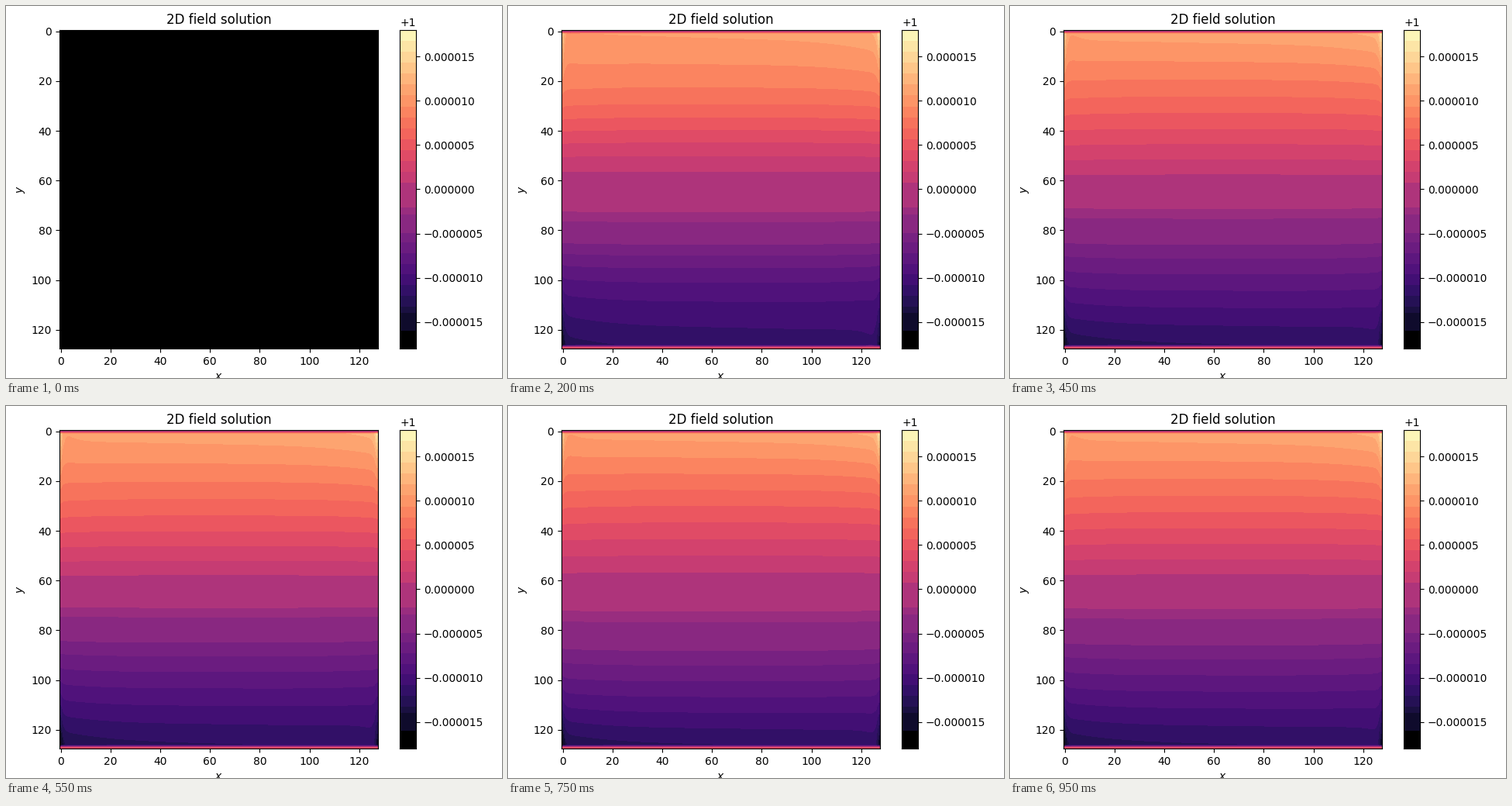
A matplotlib script for the animation above (1000 ms loop, 640 px wide and 480 px high).

```python
import numpy as np
import matplotlib.pyplot as plt
from matplotlib.animation import FuncAnimation
from matplotlib.colors import BoundaryNorm, ListedColormap

W, H, N = 640, 480, 128
FRAMES, INTERVAL = 20, 50
LIMIT = 18  # colour range, in millionths away from 1


def banded_colors():
    """Magma in steps, with wider steps at the dark end and the middle."""
    upper = np.linspace(0.8, LIMIT, 15)
    middle = [-4.9, -2.8, -2]
    lower = np.linspace(-12, -6, 6)
    dark = [-LIMIT, -16, -14, -13.3]
    levels = np.concatenate([dark, lower, middle, upper])
    mids = (levels[:-1] + levels[1:]) / 2
    colors = plt.get_cmap("magma")((mids + LIMIT) / (2 * LIMIT))
    colors[0, :3] = 0
    return ListedColormap(colors), BoundaryNorm(levels, len(mids))


cells = np.arange(N)
u = ((cells - 63.5) / 64)[:, None]
x = ((cells - 63.5) / 64)[None, :]
left, right = cells[None, :], (N - 1 - cells)[None, :]


def side_tilt():
    """Rises to the right near the top and bottom, bending at the corners."""
    slope = 0.3 * x + 0.2 * x**3
    top = slope - 0.9 * np.exp(-left / 6) + 0.3 * np.exp(-right / 14)
    bottom = slope + 0.9 * np.exp(-right / 6) - 0.3 * np.exp(-left / 14)
    return np.abs(u)**5 * np.where(u < 0, top, bottom)


TILT = side_tilt()
WALLS = -4 * u**5 * (np.exp(-left / 0.7) + np.exp(-right / 0.7))


def field(ms):
    if ms == 0:
        return np.full((N, N), -LIMIT + 0.1)
    # A steady gradient with a standing wave that rings and dies away
    ring = np.exp(-ms / 450) * np.cos(2 * np.pi * (ms - 100) / 430)
    front = np.exp(-ms / 80)
    profile = -(12.4 * u - 0.5 * u**3)
    profile -= (1.5 * ring + 4 * front) * np.sin(np.pi * u)
    profile += 5 * front * np.sin(2.5 * np.pi * u)
    values = profile * (1 + 0.03 * x**4) - 0.4 + TILT + WALLS
    values[0] = -1
    values[-1] = 4
    return np.clip(values, -LIMIT + 0.1, LIMIT - 0.1)


def add_axes(x0, y0, width, height):
    return fig.add_axes([x0 / W, 1 - (y0 + height) / H, width / W, height / H])


fig = plt.figure(figsize=(W / 100, H / 100), dpi=100, facecolor="white")
cmap, norm = banded_colors()

ax = add_axes(69, 31, 411, 411)
image = ax.imshow(field(0), cmap=cmap, norm=norm, interpolation="bilinear",
                  aspect="auto")
ax.set_title("2D field solution")
ax.set_xlabel("$x$")
ax.set_ylabel("$y$")
ax.set_xticks(range(0, 121, 20))
ax.set_yticks(range(0, 121, 20))

bar = add_axes(508, 31, 21, 411)
ramp = np.linspace(-LIMIT + 0.01, LIMIT - 0.01, 822)[:, None]
bar.imshow(ramp, cmap=cmap, norm=norm, interpolation="nearest", aspect="auto",
           origin="lower", extent=(0, 1, -LIMIT, LIMIT))
ticks = range(-15, 16, 5)
bar.set_xticks([])
bar.set_yticks(ticks, [f"{t / 1e6:.6f}".replace("-", "\u2212") for t in ticks])
bar.yaxis.tick_right()
fig.text(508 / W, 1 - 26 / H, "+1", fontsize=10, ha="left", va="baseline")


def update(frame):
    image.set_data(field(frame * INTERVAL))
    return [image]


anim = FuncAnimation(fig, update, frames=FRAMES, interval=INTERVAL,
                     repeat=True, repeat_delay=0, blit=False)
plt.show()
```
